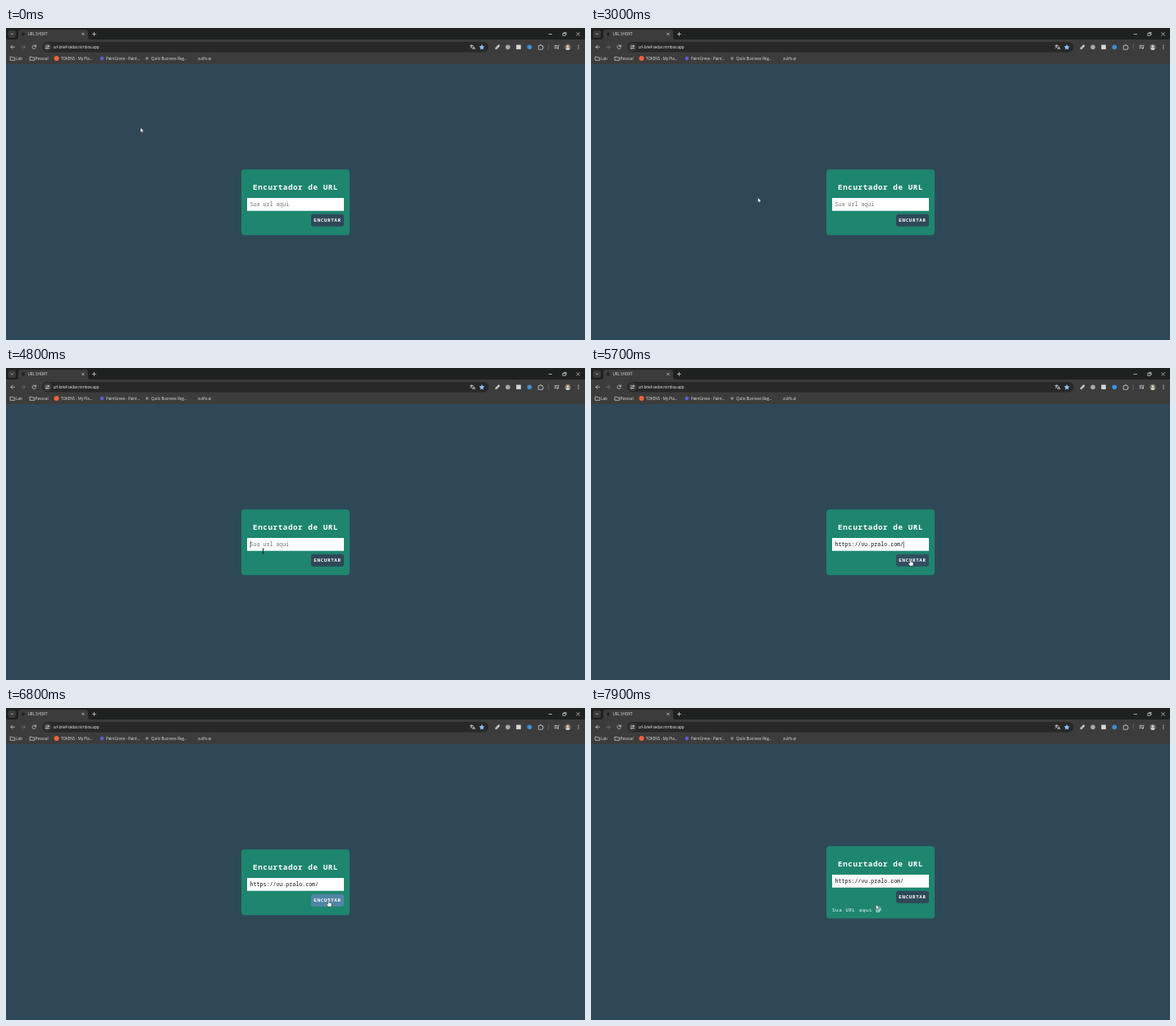
Animation of 706 by 380 pixels, one loop 8000 ms. Source, as an HTML page:

```html
<!DOCTYPE html>
<html lang="pt">
<head>
<meta charset="utf-8">
<title>URL SHORT</title>
<style>
  html, body { margin: 0; width: 100%; height: 100%; overflow: hidden; background: #2f4858; }
  svg { display: block; width: 706px; height: 380px; }
  text { white-space: pre; }
  .ui { font: 4.5px "Open Sans", "Noto Sans", sans-serif; fill: #e3e3e3; }
  .mono { font: 6.63px "Noto Sans Mono", "DejaVu Sans Mono", monospace; }
  .line { fill: none; stroke: #d5d5d5; stroke-width: .75; stroke-linecap: round; stroke-linejoin: round; }
</style>
</head>
<body>
<svg viewBox="0 0 706 380">
  <!-- browser frame -->
  <rect width="706" height="15" fill="#1f2020"/>
  <rect y="14" width="706" height="30" fill="#3c3c3c"/>
  <path d="M12 14q3 0 3-3V5q0-3 3-3H97q3 0 3 3v6q0 3 3 3z" fill="#3c3c3c"/>
  <rect x="2.5" y="2.5" width="9.5" height="9.5" rx="3" fill="#3a3a3a"/>
  <rect x="44" y="17" width="544.5" height="12.4" rx="6.2" fill="#282828"/>
  <circle cx="50.6" cy="23.2" r="4.8" fill="#3c3c3c"/>
  <circle cx="21" cy="7.6" r="2" fill="#222"/>

  <g class="line">
    <path d="M5.9 6.7l1.4 1.4 1.4-1.4M92.7 6.1l2.6 2.6m0-2.6l-2.6 2.6M105.4 7.4h4.2m-2.1-2.1v4.2"/>
    <path d="M662 7.5h3.6M679.2 6.4h2.9v2.9h-2.9zM680.3 5.4h2.8v2.8M695.8 5.6l3.6 3.6m0-3.6l-3.6 3.6"/>
    <path d="M10.4 23.2H6m2-2.1l-2.1 2.1 2.1 2.1"/>
    <path d="M18.8 23.2h4.4m-2-2.1l2.1 2.1-2.1 2.1" stroke="#777"/>
    <path d="M36.2 22.2a2.2 2.2 0 1 0 .1 1.8M36.5 20.8v1.6h-1.6"/>
    <path d="M48.4 22h2.1m1.9 0h.4M48.4 24.6h.4m2 0h2"/>
    <circle cx="51.4" cy="22" r=".7"/><circle cx="49.7" cy="24.6" r=".7"/>
    <path d="M566 21.4h3.4m-1.7-.8v.8m1.1 0q-.6 2-2.5 2.9m.4-2q.7 1.2 1.8 1.8M569.2 25.8l1.3-3.2 1.3 3.2m-2.2-1h1.8"/>
    <path d="M597 25.3l.2-1 2.4-2.4 1 1-2.4 2.4zM600 21.6l.7-.8.9.9-.8.8" stroke-width="1.1"/>
    <path d="M649.6 21.6h1.5q-.2-1.4.8-1.4t.8 1.4h1.6v1.5q1.1-.1 1.1.8t-1.1.8v1.5h-4.7z"/>
    <path d="M669 21.4h3.2M669 23h2.2M669 24.6h1.4M673.3 24.6v-3.4h1"/>
    <circle cx="672.6" cy="24.7" r=".7"/>
    <path d="M661.3 20v6.5" stroke="#5b6876"/>
    <g id="folders">
      <path d="M5.4 35.2h2l.7.8h2.7v3.3H5.4zM29.4 35.2h2l.7.8h2.7v3.3h-5.4z"/>
    </g>
  </g>
  <path d="M580.2 19.9l1 2.2 2.4.3-1.8 1.6.5 2.4-2.1-1.2-2.1 1.2.5-2.4-1.8-1.6 2.4-.3z" fill="#8fc4ff"/>
  <circle cx="612" cy="23.2" r="2.8" fill="#aaa"/>
  <rect x="622.2" y="20.5" width="5.6" height="5.4" fill="#d4d8dc"/>
  <circle cx="638.3" cy="23.2" r="2.8" fill="#3d8fd6"/>
  <circle cx="685" cy="23.2" r="3.5" fill="#8a7868"/>
  <path d="M682.3 25.5q2.7-2.7 5.4 0a3.5 3.5 0 0 1-5.4 0z" fill="#ddd"/>
  <circle cx="685" cy="22.5" r="1.3" fill="#ddd"/>
  <g fill="#ddd"><circle cx="698" cy="21.2" r=".6"/><circle cx="698" cy="23.2" r=".6"/><circle cx="698" cy="25.2" r=".6"/></g>
  <circle cx="61.6" cy="37" r="3" fill="#f0623a"/>
  <circle cx="117" cy="37" r="2.3" fill="#5b5fd6"/>
  <circle cx="172" cy="37" r="1.8" fill="#888"/>

  <g class="ui">
    <text x="26.4" y="9.2">URL SHORT</text>
    <text x="57.5" y="25" style="font-size:5px;letter-spacing:-.25px">url-brief-cedar.nimbov.app</text>
    <text x="12.2" y="38.6">Lab</text>
    <text x="35.8" y="38.6">Pessoal</text>
    <text x="67" y="38.6">TOKENS - My Pla...</text>
    <text x="122" y="38.6">PaintGrove - Paint...</text>
    <text x="177" y="38.6">Quilo Business Reg...</text>
    <text x="234" y="38.6">zulifo.ai</text>
  </g>

  <!-- page -->
  <rect id="card" x="287" width="132" rx="4" fill="#1e866e"/>
  <g id="form" class="mono">
    <text x="301.1" y="196.7" fill="#fff" style="font-size:9.2px;font-weight:700;letter-spacing:.6px">Encurtador de URL</text>
    <rect x="294" y="207" width="118" height="15.7" fill="#fff"/>
    <text id="field" x="297.6" y="217.2"></text>
    <path id="caret" d="M0 210.7v8.4" stroke="#111" stroke-width=".6"/>
    <rect id="button" x="372" y="226.7" width="40" height="15" rx="3"/>
    <text x="375.3" y="236.4" fill="#fff" style="font-size:5.9px;font-weight:700;letter-spacing:.64px">ENCURTAR</text>
  </g>
  <g id="result">
    <text class="mono" x="294" y="247.6" fill="#fff" style="font-size:5.9px;letter-spacing:.56px">Sua URL aqui</text>
    <path class="line" style="stroke:#fff;stroke-width:.65" d="M349.4 242.4h2.4l1.4 1.4v3h-3.8zM349.4 243.7h-1.5v4.6h3.8v-1.5M350.6 244.6h1.4m-1.4 1.1h1.4"/>
  </g>

  <!-- pointers -->
  <path id="arrow" d="M0 0V5.9L1.4 4.7L2.3 6.6L3.2 6.2L2.3 4.4H4.1Z" fill="#fff" stroke="#111" stroke-width=".35"/>
  <path id="beam" d="M-1.1-3.2h.7q.4 0 .4.4V2.8q0 .4-.4.4h-.7M1.1-3.2H.4Q0-3.2 0-2.8V2.8q0 .4.4.4h.7" fill="none" stroke="#111" stroke-width=".6"/>
  <path id="hand" d="M-1.5-3.2q0-.7.6-.7t.6.7V-.8q1-.3 1.2.2 1-.2 1.2.4.9 0 .9.8V2q0 1-.7 2H-1.2Q-1.8 2.8-2.9 1.4q-.3-.8.4-.9.5 0 1 .7z" fill="#fff" stroke="#111" stroke-width=".35"/>
</svg>
<script>
const $ = id => document.getElementById(id);
const show = (id, on) => $(id).style.display = on ? '' : 'none';

// pointer: start time, shape, x, y
const moves = [
  [0, 'arrow', 164, 121.3], [500, 'arrow', 170, 140], [600, 'arrow', 184, 188],
  [700, 'arrow', 190.6, 206.5], [1200, 'arrow', 203.5, 206.5], [3200, 'arrow', 211.5, 201.5],
  [3700, 'arrow', 262, 211], [3800, 'beam', 312.5, 223.5], [4200, 'beam', 313.5, 224.3],
  [4800, 'beam', 313.5, 223], [5200, ''], [5600, 'arrow', 370, 230],
  [5700, 'hand', 390, 237], [6000, 'hand', 396, 237], [6200, 'hand', 402, 236.3],
  [6400, 'hand', 406.5, 236], [6800, 'hand', 394, 238], [7200, 'hand', 376.5, 233.3],
  [7400, 'arrow', 346.6, 239], [7900, 'arrow', 347.6, 239.3]
];
const dark = [47, 72, 88], light = [80, 133, 165];

function draw(now) {
  const t = Math.floor(now % 8000 / 100) * 100;
  const pasted = t >= 5300, open = t >= 7000;

  $('card').setAttribute('y', open ? 168.3 : 172.3);
  $('card').setAttribute('height', open ? 88 : 80);
  $('form').setAttribute('transform', `translate(0 ${open ? -4 : 0})`);
  show('result', open);

  $('field').textContent = pasted ? 'https://vu.pralo.com/' : 'Sua url aqui';
  $('field').setAttribute('fill', pasted ? '#111' : '#757575');
  $('caret').setAttribute('transform', `translate(${pasted ? 381.3 : 298} 0)`);
  show('caret', t >= 4800 && t < 5200 || pasted && t < 5800);

  const hover = t >= 7400 ? 0 : Math.min(1, Math.max(0, (t - 5650) / 500));
  $('button').setAttribute('fill', `rgb(${dark.map((c, i) => Math.round(c + (light[i] - c) * hover))})`);

  const [, shape, x, y] = moves.findLast(m => m[0] <= t);
  for (const id of ['arrow', 'beam', 'hand']) {
    show(id, id === shape);
    if (id === shape) $(id).setAttribute('transform', `translate(${x} ${y})`);
  }
}

const start = performance.now();
function tick() {
  draw(performance.now() - start);
  requestAnimationFrame(tick);
}
tick();
</script>
</body>
</html>
```
